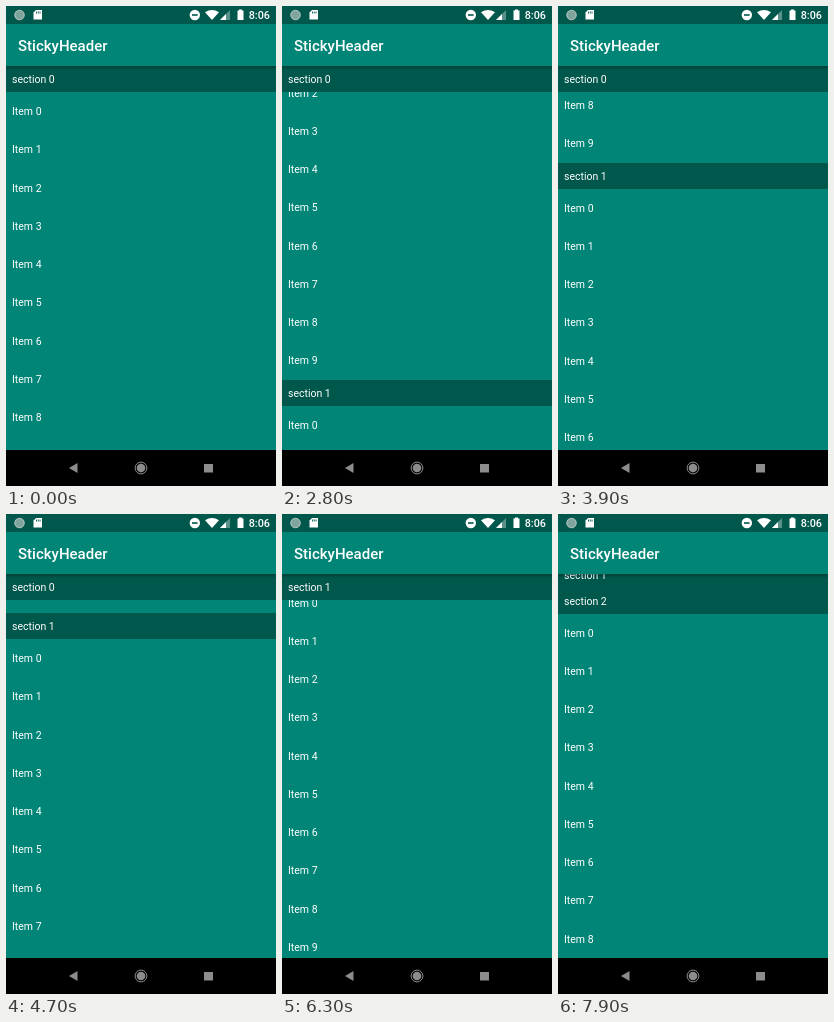
An HTML page with a canvas that plays this animation: 270x480 px, repeating every 8 s.

```html
<!DOCTYPE html>
<html lang="en">
<head>
<meta charset="utf-8">
<title>Sticky header list</title>
<style>
  html, body { margin: 0; width: 100%; height: 100%; overflow: hidden; background: #000; }
  canvas { display: block; width: 270px; height: 480px; }
</style>
</head>
<body>
<canvas id="stage"></canvas>
<script>
const W = 270, H = 480, LOOP = 8000, STEP = 100;
const LIST_TOP = 60, LIST_BOTTOM = 444;
const HEAD = 26, ROW = 38.25, ROWS = 10, SECTION = HEAD + ROW * ROWS;
const PRIMARY = '#008577', DARK = '#00574b', NAV = '#8c8c8c';
const FONT = 'Roboto, "Noto Sans", sans-serif';

// Scroll path: [time in ms, offset in px]
const PATH = [
  [0, 0], [2200, 0], [2800, 95], [3400, 239.5], [3900, 312], [4300, 312],
  [4700, 369.5], [5400, 397], [6300, 425], [6900, 696], [7300, 696],
  [7400, 710.5], [7900, 803.5], [8000, 812]
];

const canvas = document.getElementById('stage');
const ctx = canvas.getContext('2d');
const dpr = window.devicePixelRatio || 1;
canvas.width = W * dpr;
canvas.height = H * dpr;
ctx.scale(dpr, dpr);

const slopes = PATH.slice(1).map(([t, y], i) => (y - PATH[i][1]) / (t - PATH[i][0]));

// Harmonic mean keeps the curve monotone between points
function tangent(i) {
  const a = slopes[i - 1], b = slopes[i];
  if (a === undefined) return b;
  if (b === undefined) return a;
  return a * b > 0 ? 2 * a * b / (a + b) : 0;
}

function scrollAt(time) {
  let i = 0;
  while (i < PATH.length - 2 && time >= PATH[i + 1][0]) i++;
  const [t0, y0] = PATH[i], [t1, y1] = PATH[i + 1];
  const d = t1 - t0, u = (time - t0) / d, v = 1 - u;
  return y0 * (1 + 2 * u) * v * v + y1 * u * u * (3 - 2 * u)
    + d * u * v * (tangent(i) * v - tangent(i + 1) * u);
}

function rect(x, y, w, h, color) {
  ctx.fillStyle = color;
  ctx.fillRect(x, y, w, h);
}

function disc(x, y, r, color) {
  ctx.fillStyle = color;
  ctx.beginPath();
  ctx.arc(x, y, r, 0, Math.PI * 2);
  ctx.fill();
}

function ring(x, y, r, width, color) {
  ctx.strokeStyle = color;
  ctx.lineWidth = width;
  ctx.beginPath();
  ctx.arc(x, y, r, 0, Math.PI * 2);
  ctx.stroke();
}

function poly(color, ...points) {
  ctx.fillStyle = color;
  ctx.beginPath();
  points.forEach(([x, y]) => ctx.lineTo(x, y));
  ctx.closePath();
  ctx.fill();
}

function text(str, x, y, size, weight = 400, align = 'left') {
  ctx.font = `${weight} ${size}px ${FONT}`;
  ctx.textAlign = align;
  ctx.fillStyle = '#fff';
  ctx.fillText(str, x, y);
}

function shadow(y, size, alpha) {
  const g = ctx.createLinearGradient(0, y, 0, y + size);
  g.addColorStop(0, `rgba(0,0,0,${alpha})`);
  g.addColorStop(1, 'rgba(0,0,0,0)');
  rect(0, y, W, size, g);
}

function header(n, y) {
  rect(0, Math.round(y), W, HEAD, DARK);
  text('section ' + n, 6, y + HEAD / 2 + 4.1, 10.5);
}

function list(scroll) {
  ctx.save();
  ctx.beginPath();
  ctx.rect(0, LIST_TOP, W, LIST_BOTTOM - LIST_TOP);
  ctx.clip();
  const first = Math.floor(scroll / SECTION);
  for (let s = first; s <= first + 1; s++) {
    const top = LIST_TOP + s * SECTION - scroll;
    header(s, top);
    for (let i = 0; i < ROWS; i++) {
      text('Item ' + i, 6, top + HEAD + (i + 0.5) * ROW + 4.1, 10.5);
    }
  }
  const next = LIST_TOP + (first + 1) * SECTION - scroll;
  header(first, Math.min(LIST_TOP, next - HEAD));
  shadow(LIST_TOP, 4, 0.25);
  ctx.restore();
}

function statusBar() {
  rect(0, 0, W, 18, DARK);
  disc(13.5, 9, 5.2, '#7fa39d');
  ring(13.5, 9, 4.6, 1, '#a9c0bc');
  poly('#fff', [30, 4], [36, 4], [36, 13.5], [27.5, 13.5], [27.5, 6.5]);
  [30, 31.8, 33.6].forEach(x => rect(x, 5.5, 0.9, 2, DARK));

  disc(188.8, 9, 5.2, '#fff');
  rect(186, 8.2, 5.6, 1.6, DARK);

  ctx.fillStyle = '#fff';
  ctx.beginPath();
  ctx.moveTo(206, 14);
  ctx.lineTo(199, 6.2);
  ctx.quadraticCurveTo(206, 1.8, 213, 6.2);
  ctx.fill();

  poly('rgba(255,255,255,.35)', [224, 4], [224, 14], [214, 14]);
  poly('#fff', [220, 8], [220, 14], [214, 14]);

  rect(233, 3.5, 3, 1.5, '#fff');
  rect(231.5, 4.5, 6, 9.5, '#fff');
  text('8:06', 264, 13, 10.8, 500, 'right');
}

function navBar() {
  rect(0, LIST_BOTTOM, W, H - LIST_BOTTOM, '#000');
  poly(NAV, [63, 462], [71.5, 457], [71.5, 467]);
  ring(135, 462, 5.9, 1, NAV);
  disc(135, 462, 4.3, NAV);
  rect(198, 458, 9, 8.5, NAV);
}

function draw(time) {
  rect(0, 0, W, H, PRIMARY);
  list(scrollAt(time));
  statusBar();
  text('StickyHeader', 12, 45, 15, 500);
  navBar();
}

const start = performance.now();
function tick() {
  const t = Math.max(0, performance.now() - start) % LOOP;
  draw(Math.floor(t / STEP) * STEP);
  requestAnimationFrame(tick);
}
tick();
</script>
</body>
</html>
```
